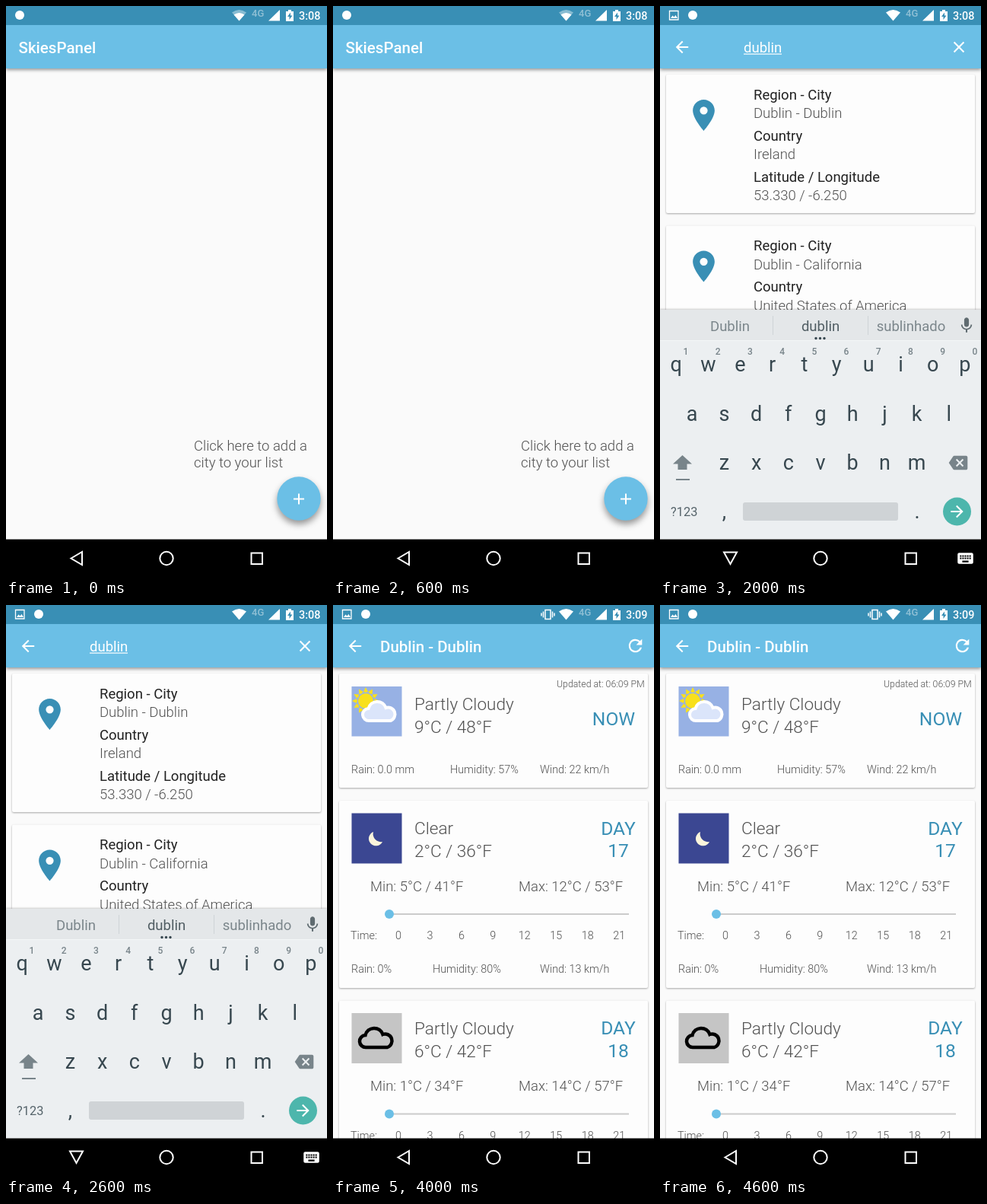
An HTML page that plays this animation: 422 px wide and 750 px high, repeating every 5 s.

```html
<!DOCTYPE html>
<html lang="en">
<head>
<meta charset="utf-8">
<title>Weather list</title>
<style>
  html, body { margin: 0; width: 100%; height: 100%; overflow: hidden; background: #fafafa; }
  svg { display: block; width: 100%; height: 100%; font-family: Roboto, sans-serif; }
  .bar { filter: drop-shadow(0 2px 2px #0006); }
  .card { fill: #fdfdfd; filter: drop-shadow(0 1px 1px #0005); }
  .fab { fill: #6bbfe6; filter: drop-shadow(0 5px 4px #0006); }
</style>
</head>
<body>
<svg id="stage" viewBox="0 0 422 750"></svg>
<script>
const SKY = '#6bbfe6', DEEP = '#398fb5', INK = '#212121', SOFT = '#505050', KEY = '#37474f';
const STEP = 1000, COL = 42.2;

const PATHS = {
  back: 'M20 11H7.83l5.59-5.59L12 4l-8 8 8 8 1.41-1.41L7.83 13H20z',
  close: 'M19 6.41L17.59 5 12 10.59 6.41 5 5 6.41 10.59 12 5 17.59 6.41 19 12 13.41 17.59 19 19 17.59 13.41 12z',
  bin: 'M6 19c0 1.1.9 2 2 2h8c1.1 0 2-.9 2-2V7H6zM19 4h-3.5l-1-1h-5l-1 1H5v2h14z',
  pin: 'M12 2C8.13 2 5 5.13 5 9c0 5.25 7 13 7 13s7-7.75 7-13c0-3.87-3.13-7-7-7zm0 9.5a2.5 2.5 0 0 1 0-5 2.5 2.5 0 0 1 0 5z',
  mic: 'M12 14c1.66 0 3-1.34 3-3V5c0-1.66-1.34-3-3-3S9 3.34 9 5v6c0 1.66 1.34 3 3 3zm5.3-3c0 3-2.54 5.1-5.3 5.1S6.7 14 6.7 11H5c0 3.41 2.72 6.23 6 6.72V21h2v-3.28c3.28-.48 6-3.3 6-6.72z',
  erase: 'M22 3H7c-.69 0-1.23.35-1.59.88L0 12l5.41 8.11c.36.53.9.89 1.59.89h15c1.1 0 2-.9 2-2V5c0-1.1-.9-2-2-2zm-3 12.59L17.59 17 14 13.41 10.41 17 9 15.59 12.59 12 9 8.41 10.41 7 14 10.59 17.59 7 19 8.41 15.41 12z',
  reload: 'M17.65 6.35A8 8 0 1 0 19.73 14h-2.08A6 6 0 1 1 16.22 7.78L13 11h7V4z',
  board: 'M20 5H4a2 2 0 0 0-2 2v10a2 2 0 0 0 2 2h16a2 2 0 0 0 2-2V7a2 2 0 0 0-2-2zM11 8h2v2h-2zm0 3h2v2h-2zM8 8h2v2H8zm0 3h2v2H8zM5 8h2v2H5zm0 3h2v2H5zm3 4h8v2H8zm6-7h2v2h-2zm0 3h2v2h-2zm3-3h2v2h-2zm0 3h2v2h-2z',
  cloud: 'M-14 12a8 8 0 0 1-1-16a12 12 0 0 1 23-1a8.500 8.500 0 0 1 6 17z'
};

const text = (s, x, y, size = 18.5, fill = INK, weight = 400, extra = '') =>
  `<text x="${x}" y="${y}" font-size="${size}" fill="${fill}" font-weight="${weight}" ${extra}>${s}</text>`;
const light = (s, x, y, size = 18.5) => text(s, x, y, size, SOFT, 300);
const mid = (s, x, y, size, fill, weight = 400) => text(s, x, y, size, fill, weight, 'text-anchor="middle"');
const rect = (x, y, w, h, fill, extra = '') =>
  `<rect x="${x}" y="${y}" width="${w}" height="${h}" fill="${fill}" ${extra}/>`;
const circle = (x, y, r, fill, extra = '') => `<circle cx="${x}" cy="${y}" r="${r}" fill="${fill}" ${extra}/>`;
const path = (d, fill, extra = '') => `<path d="${d}" fill="${fill}" ${extra}/>`;
const line = (d, color = '#fff', width = 2) => path(d, 'none', `stroke="${color}" stroke-width="${width}"`);
const move = (x, y, s) => `<g transform="translate(${x} ${y})">${s}</g>`;
const icon = (name, x, y, fill = '#fff', scale = 1.026) =>
  path(PATHS[name], fill, `fill-rule="evenodd" transform="translate(${x} ${y}) scale(${scale}) translate(-12 -12)"`);
const card = (y, h) => `<rect class="card" x="8" y="${y}" width="406" height="${h}" rx="2"/>`;

function statusBar({ first, clock = '3:08', buzz }) {
  const fan = 'M306.500 19.500L297 8.500Q306.500 1.500 316 8.500z';
  const picture = line('M12.500 6.500h11.500v11.500h-11.500z', '#fff', 1.3) + path('M14 16l2.500-3.500 2 2 2-2.500 2.500 4z', '#fff');
  return rect(0, 0, 422, 25, DEEP) +
    (first ? '' : picture) + circle(first ? 18 : 43, 12, 6, '#fff') +
    (buzz ? line('M279 6.500h7v12h-7zM276.500 8.500v8M288.500 8.500v8M274 10.500v4M291 10.500v4', '#fff', 1.5) : '') +
    path(fan, '#fff', first ? 'opacity=".4"' : '') +
    (first ? path('M306.500 19.500L299.500 11.500Q306.500 6.500 313.500 11.500z', '#fff') : '') +
    text('4G', 323, 13.5, 13, '#ffffff70', 500) +
    path('M345 19.500L360 5v14.500z', '#fff') +
    path('M368 7h3V5h4v2h3v13h-10z', '#fff') + path('M374 8.500l-4 5.500h2.500v4l4-5.500h-2.500z', DEEP) +
    text(clock, 385, 17.5, 14.4, '#fff', 500);
}

const toolBar = inner => `<rect class="bar" y="24" width="422" height="58" fill="${SKY}"/>` + inner;
const title = (s, x) => text(s, x, 61.5, 20.5, '#fff', 500);

const navBar = typing => rect(0, 700.5, 422, 50, '#000') +
  line(typing ? 'M84 717.500h17l-8.500 15.500z' : 'M85.500 725.500l14.500-8.500v17z') +
  circle(211, 725.5, 8.7, 'none', 'stroke="#fff" stroke-width="2"') +
  line('M322.500 718.500h14.500v14.500h-14.500z') +
  (typing ? icon('board', 401.5, 725.5) : '');

const fab = '<circle class="fab" cx="385" cy="647" r="28.7"/>' + line('M378 647.500h14M385 640.500v14');

function place(dy, region, country, where) {
  const row = (label, value, y) => text(label, 123, y) + light(value, 123, y + 24.5);
  return move(0, dy, card(90, 182) + icon('pin', 57.5, 143.5, DEEP, 2.05) +
    row('Region - City', region, 122.5) + row('Country', country, 176.5) +
    row('Latitude / Longitude', where, 230.5));
}
const irish = place(0, 'Dublin - Dublin', 'Ireland', '53.330 / -6.250');

function keyboard(words, active) {
  const row = (letters, x, y) =>
    [...letters].map((c, i) => mid(c, x + COL * i, y, 27, KEY)).join('');
  const hints = [...'1234567890'].map((c, i) => mid(c, 34 + COL * i, 457.5, 12, '#78848a', 500)).join('');
  return `<rect class="bar" y="399" width="422" height="301" fill="#eceff1" style="filter:drop-shadow(0 -1px 1px #0003)"/>` +
    rect(0, 399, 422, 40, '#e4e7e9') + rect(0, 439, 422, 1, '#f4f6f7') +
    line('M148.500 407v25M273.500 407v25', '#cfd4d7', 1) +
    words.map((w, i) => mid(w, 92 + 119 * i, 426.5, 18.5, i == active ? '#505d63' : '#7b868b')).join('') +
    [205, 210.5, 216].map(x => circle(x, 436.5, 1.7, KEY)).join('') +
    icon('mic', 403, 419.5, '#5f6b70') + hints +
    row('qwertyuiop', COL / 2, 480) + row('asdfghjkl', COL, 545) + row('zxcvbnm', 2 * COL, 609) +
    path('M29.500 590l12.500 11.500h-6.500v7.500h-12v-7.500h-6.500z', '#78848a') + rect(21, 621, 18, 2, '#78848a') +
    icon('erase', 392, 600, '#78848a') +
    text('?123', 14, 670, 16.4, '#55636a') + mid(',', 84.4, 673, 27, KEY) + mid('.', 338, 673, 27, KEY) +
    rect(109, 652, 204, 24, '#cfd3d6', 'rx="3"') + circle(390.5, 664, 18.5, '#4db6ac') +
    `<g transform="rotate(180 390.500 664)">${icon('back', 390.5, 664)}</g>`;
}

const typing = (entry, body, words, active) => body + keyboard(words, active) +
  toolBar(icon('back', 29, 54) + entry + icon('close', 393, 54)) + statusBar({}) + navBar(true);

function sunIcon() {
  const rays = Array.from({ length: 12 }, (_, i) =>
    `<path d="M0-11l3-1-3-6-3 6z" fill="#f8e01c" transform="translate(43 126) rotate(${i * 30})"/>`).join('');
  return rect(24.5, 107, 66, 65.5, '#97b1e4') + rays + circle(43, 126, 10, '#f8e01c') +
    move(61.5, 140, path(PATHS.cloud, '#dbe5fa', 'stroke="#fff" stroke-width="4"'));
}
const moonIcon = rect(24.5, 273.5, 66, 66, '#3b4792') +
  path('M53 298a9.500 9.500 0 1 0 12 13a10.500 10.500 0 0 1-12-13z', '#fbf5dc');
const cloudIcon = rect(24.5, 273.5, 66, 66, '#c5c5c5') +
  move(57.5, 306.5, path(PATHS.cloud, 'none', 'stroke="#000" stroke-width="4.5"'));

const summary = (sky, temp, y) => light(sky, 107, y, 22.6) + light(temp, 107, y + 30, 22.6);
const details = (rain, wet, x, wind, y) =>
  light('Rain: ' + rain, 24, y, 14.4) + light('Humidity: ' + wet, x, y, 14.4) + light('Wind: ' + wind, 272, y, 14.4);

const day = (dy, date, art, sky, temp, min, max) => move(0, dy,
  card(257, 246) + art + summary(sky, temp, 301) +
  mid('DAY', 375, 301.5, 24.6, DEEP) + mid(date, 375, 331, 24.6, DEEP) +
  light('Min: ' + min, 49, 375.5) + light('Max: ' + max, 244, 375.5) +
  rect(74, 405, 315, 2, '#cbcbcb') + circle(74, 406, 6, SKY) + light('Time:', 23, 439, 14.4) +
  Array.from({ length: 8 }, (_, i) => mid(i * 3, 86 + 41.45 * i, 439, 14.4, SOFT, 300)).join('') +
  details('0%', '80%', 131, '13 km/h', 483));

const appBar = toolBar(title('SkiesPanel', 16.5));

const scenes = [
  light('Click here to add a', 247, 584) + light('city to your list', 247, 605.5) + fab +
    appBar + statusBar({ first: true }) + navBar(),

  typing(text('Type your City here…', 110, 60.5, 18.5, '#ffffff80'), '', ['não', 'o', 'a']),

  typing(text('dublin', 110, 60.5, 18.5, '#fff') + rect(110, 62.5, 50, 1.2, '#fff'),
    irish + place(198.5, 'Dublin - California', 'United States of America', '37.700 / -121.930'),
    ['Dublin', 'dublin', 'sublinhado'], 1),

  irish + icon('bin', 385, 119, '#606060') + fab + appBar + statusBar({}) + navBar(),

  card(90, 150) + sunIcon() + light('Updated at: 06:09 PM', 294, 107.5, 12.3) +
    summary('Partly Cloudy', '9°C / 48°F', 138) + mid('NOW', 369, 157.5, 24.6, DEEP) +
    details('0.0 mm', '57%', 154, '22 km/h', 220.5) +
    day(0, 17, moonIcon, 'Clear', '2°C / 36°F', '5°C / 41°F', '12°C / 53°F') +
    day(262.5, 18, cloudIcon, 'Partly Cloudy', '6°C / 42°F', '1°C / 34°F', '14°C / 57°F') +
    toolBar(icon('back', 29, 54) + title('Dublin - Dublin', 62) + icon('reload', 397.5, 53.5, '#fff', 1.1)) +
    statusBar({ clock: '3:09', buzz: true }) + navBar()
];

const stage = document.getElementById('stage');
stage.innerHTML = rect(0, 0, 422, 750, '#fafafa') + scenes.map(s => `<g class="scene">${s}</g>`).join('');
const groups = stage.querySelectorAll('.scene');

function draw() {
  const now = Math.floor(performance.now() / STEP) % scenes.length;
  groups.forEach((g, i) => g.style.display = i == now ? '' : 'none');
  requestAnimationFrame(draw);
}
draw();
</script>
</body>
</html>
```
